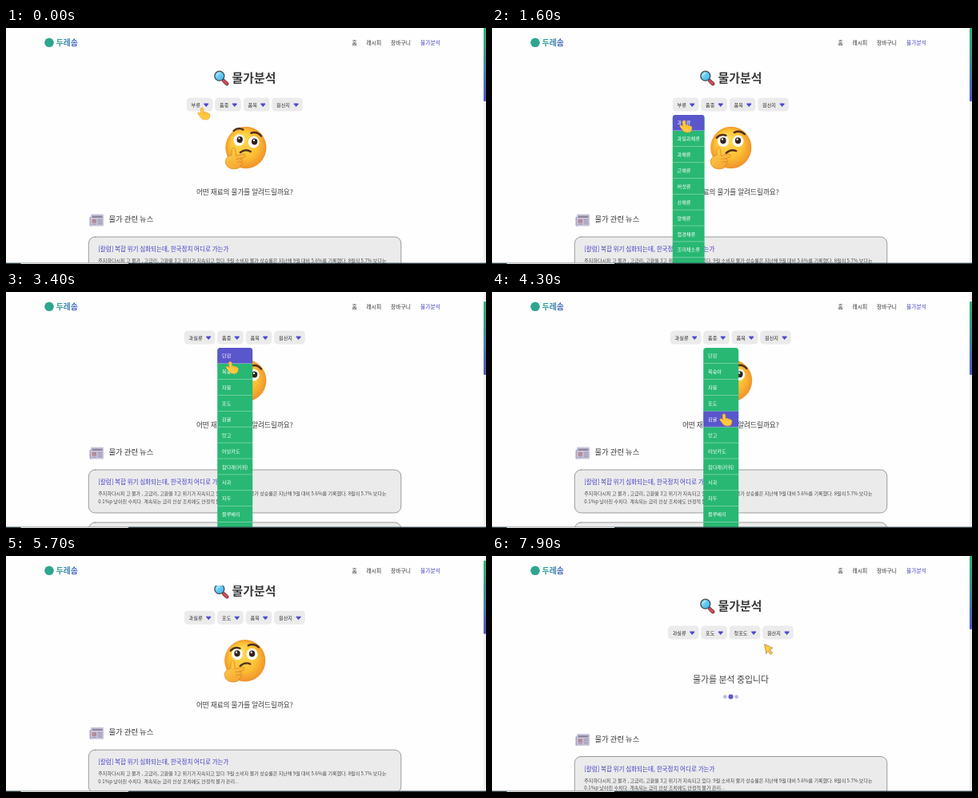
These frames come from a looping animation (600 by 296 pixels, 8000 ms). An HTML page with a canvas:

```html
<!DOCTYPE html>
<html lang="ko">
<head>
<meta charset="utf-8">
<title>물가분석</title>
<style>
  html, body { margin: 0; width: 100%; height: 100%; overflow: hidden; background: #fefefe; }
  canvas { display: block; width: 600px; height: 296px; }
</style>
</head>
<body>
<canvas id="stage"></canvas>
<script>
const W = 600, H = 296, LOOP = 8000;
const FONT = '"Noto Sans CJK KR", "Noto Sans CJK", "Noto Sans", sans-serif';
const GREEN = '#28b873', PURPLE = '#5a56cb', INK = '#3a3a3c';
const canvas = document.getElementById('stage');
const ctx = canvas.getContext('2d');
const dpr = window.devicePixelRatio || 1;
canvas.width = W * dpr;
canvas.height = H * dpr;

const ease = p => p * p * (3 - 2 * p);
const ramp = (t, a, b) => ease(Math.min(1, Math.max(0, (t - a) / (b - a))));

// y is the optical centre of the line
function text(str, x, y, size, color = INK, weight = 400, align = 'left') {
  ctx.font = `${weight} ${size}px ${FONT}`;
  ctx.textAlign = align;
  ctx.fillStyle = color;
  ctx.fillText(str, x, y + size * 0.37);
}
function box(x, y, w, h, r, fill, stroke, line = 0.8) {
  ctx.beginPath();
  ctx.roundRect(x, y, w, h, r);
  if (fill) { ctx.fillStyle = fill; ctx.fill(); }
  if (stroke) { ctx.strokeStyle = stroke; ctx.lineWidth = line; ctx.stroke(); }
}
function oval(x, y, rx, ry, fill, angle = 0) {
  ctx.beginPath();
  ctx.ellipse(x, y, rx, ry, angle, 0, 7);
  ctx.fillStyle = fill;
  ctx.fill();
}
function curve(color, width, x0, y0, cx, cy, x1, y1) {
  ctx.beginPath();
  ctx.moveTo(x0, y0);
  ctx.quadraticCurveTo(cx, cy, x1, y1);
  ctx.strokeStyle = color;
  ctx.lineWidth = width;
  ctx.lineCap = 'round';
  ctx.stroke();
}
function shape(d, fill, stroke, line) {
  const path = new Path2D(d);
  ctx.fillStyle = fill;
  ctx.fill(path);
  if (stroke) {
    ctx.strokeStyle = stroke;
    ctx.lineWidth = line;
    ctx.lineJoin = 'round';
    ctx.stroke(path);
  }
}
function gradient(x0, y0, x1, y1, ...colors) {
  const g = ctx.createLinearGradient(x0, y0, x1, y1);
  colors.forEach((c, i) => g.addColorStop(i / (colors.length - 1), c));
  return g;
}

const menus = [
  { slot: 0, from: 1000, to: 1850, items: ['과실류', '과일과채류', '과채류', '근채류', '버섯류', '산채류', '양채류', '엽경채류', '조미채소류', '서류'] },
  { slot: 1, from: 2750, to: 5350, items: ['단감', '복숭아', '자몽', '포도', '감귤', '망고', '아보카도', '참다래(키위)', '사과', '자두', '블루베리', '배'] },
  { slot: 2, from: 6300, to: 7350, items: ['기타포도', '레드글로브', '거봉', '마스캇베리에이', '청포도', '피오네', '포도', '고처', '블랙올림피아', '델라웨어'] }
];
const LOADING = 7400;

// time, x, y of the pointer tip
const track = [
  [0, 245, 100], [800, 243, 100], [1100, 243, 100], [1500, 240, 116], [1850, 240, 116],
  [2300, 277, 97], [2900, 277, 97], [3300, 280, 85], [4200, 290, 153], [4450, 290, 153],
  [5000, 286, 135], [5450, 286, 135], [5900, 317, 95], [6300, 317, 95], [6600, 327, 124],
  [6750, 327, 124], [7150, 324, 196], [7400, 324, 196], [7750, 340, 110], [8000, 340, 110]
];
function pointerAt(t) {
  const i = track.findIndex(k => k[0] > t);
  const a = track[i - 1], b = track[i], p = ramp(t, a[0], b[0]);
  return [a[1] + (b[1] - a[1]) * p, a[2] + (b[2] - a[2]) * p];
}
const scrollAt = t => 39 * (ramp(t, 2950, 3350) - ramp(t, 5450, 5940));

function buttonsAt(t) {
  const labels = [t < 1850 ? '부류' : '과실류', t < 5350 ? '품종' : '포도', t < 7350 ? '품목' : '청포도', '원산지'];
  const widths = labels.map(s => 20.9 + 5.9 * s.length);
  let x = 298.3 - (widths.reduce((a, b) => a + b) + 8.4) / 2;
  return labels.map((label, i) => {
    const b = { label, x, w: widths[i] };
    x += b.w + 2.8;
    return b;
  });
}
function drawButton({ label, x, w }) {
  box(x, 87.5, w, 17, 4.5, '#ebebeb');
  text(label, x + 5.8, 96.3, 6.15, '#2e2e30', 500);
  const c = x + w - 8;
  shape(`M${c - 2.6} 95 h5.2 l-2.6 3.2 z`, '#4a45cf', '#4a45cf', 1);
}

function drawMenu(menu, x, hover) {
  const pitch = 19.9, top = 109;
  ctx.font = `500 6.15px ${FONT}`;
  const w = Math.max(...menu.items.map(s => ctx.measureText(s).width)) + 11.6;
  ctx.save();
  box(x, top, w, pitch * menu.items.length, 4, GREEN);
  ctx.clip();
  menu.items.forEach((item, i) => {
    const y = top + i * pitch;
    if (hover >= y && hover < y + pitch) {
      ctx.fillStyle = PURPLE;
      ctx.fillRect(x, y, w, pitch);
    }
    ctx.fillStyle = 'rgba(255,255,255,.55)';
    ctx.fillRect(x, y + pitch - 0.6, w, 0.6);
    text(item, x + 5.8, y + 10, 6.15, '#fff', 500);
  });
  ctx.restore();
}

function drawLens() {
  curve('#4b3540', 4.4, 272.2, 66.2, 274, 68, 276.2, 70);
  curve('#e0484e', 3, 272.2, 66.2, 274, 68, 276.2, 70);
  oval(266.8, 60.2, 6.6, 6.6, '#3c4650');
  oval(266.8, 60.2, 5.4, 5.4, gradient(262, 55, 271, 66, '#8fe0fa', '#3fb4ea'));
  curve('#d6f5ff', 1, 263.6, 60, 264, 57.2, 266.6, 56.8);
}

function drawPaper(y) {
  box(104.5, y - 5, 4, 12, 1.5, '#a9a4bd');
  box(106, y - 8, 16, 15, 1, '#cbc6dc');
  box(107.5, y - 6, 13, 2.4, 0.4, '#8b87a0');
  box(107.5, y - 1.8, 5.6, 5, 0.4, '#b58a9d');
  for (let i = 0; i < 4; i++) box(114.5, y - 1.8 + i * 1.9, 6, 0.9, 0, '#928da8');
  box(107.5, y + 4.2, 5.6, 0.9, 0, '#928da8');
}

function drawFace(t) {
  const sway = Math.tanh(2 * Math.cos((t - 200) / 3400 * 2 * Math.PI));
  ctx.save();
  ctx.translate(299.3 + sway * 0.6, 150);
  const skin = ctx.createRadialGradient(-6, -12, 3, 0, 0, 27);
  skin.addColorStop(0, '#ffdc55');
  skin.addColorStop(0.6, '#fdc034');
  skin.addColorStop(1, '#ee8f2c');
  oval(0, 0, 25.6, 26.2, skin);
  ctx.save();
  ctx.rotate(0.07 + sway * 0.07);
  for (const x of [-9.8, 8.8]) {
    oval(x, -8.2, 6.9, 7.3, '#fff');
    oval(x + 0.4 + sway * 0.5, -8.8, 3.7, 4, '#33231f');
    oval(x - 0.5 + sway * 0.5, -10.4, 1.1, 1.2, '#fff');
  }
  const lift = sway * 3.5;
  curve('#51301f', 2.5, -18, -15.5 - lift, -13, -21 - lift, -6.5, -18.5 - lift);
  curve('#51301f', 2.5, 4, -19, 11, -22.5, 17, -17);
  curve('#51301f', 2.4, -6, 6.8, 0, 1.2, 6.5, 4.2);
  ctx.restore();
  const hand = gradient(-20, 0, -5, 27, '#ffd34d', '#f4a02e');
  shape('M-17.6 2.5 c0-3 3.9-3 4.2 0 l1 8 c4-1 8-2.4 10.2-2.2 c2.2.4 2 3.3 0 4 l-4.6 1.6 c3 .9 3 3 1.3 4 c1.4 1.2 1 3.2-.8 3.9 c-.3 3-4 5-8.3 5 c-7.4 0-11.6-4.4-10.6-11 c.4-3.2 5-6 7-6 z',
    hand, '#dc8723', 0.8);
  curve('#d98622', 0.8, -12, 14.5, -9, 13, -5.6, 13.9);
  curve('#d98622', 0.8, -11, 18.2, -8, 17, -5, 17.9);
  ctx.restore();
}

function drawLoading(t) {
  text('물가를 분석 중입니다', 298.5, 154.5, 10.9, '#424244', 400, 'center');
  for (let i = 0; i < 3; i++) {
    const k = Math.max(0, Math.cos(((t - 7900) / 900 - (i - 1) / 3) * 2 * Math.PI));
    ctx.globalAlpha = 0.4 + 0.6 * k;
    oval(291.3 + i * 7.2, 176.6, 2.4 + 0.6 * k, 2.4 + 0.6 * k, PURPLE);
  }
  ctx.globalAlpha = 1;
}

function drawNews(shift) {
  drawPaper(241.5 + shift);
  text('물가 관련 뉴스', 128.5, 239.7 + shift, 9.35, INK, 500);
  for (let i = 0; i < 2; i++) box(103.3, 262 + shift + i * 66, 390.5, 54, 8, '#ebebeb', '#858585');
  text('[칼럼] 복합 위기 심화되는데, 한국정치 어디로 가는가', 115.3, 277.3 + shift, 7.55, '#3f3cc4', 500);
  text('주지하다시피 고 물가 , 고금리, 고환율 3고 위기가 지속되고 있다. 9월 소비자 물가 상승률은 지난해 9월 대비 5.6%를 기록했다. 8월의 5.7% 보다는', 115.3, 292 + shift, 6.06, '#48484a');
  text('0.1%p 낮아진 수치다. 계속되는 금리 인상 조치에도 안정적 물가 관리...', 115.3, 301.4 + shift, 6.06, '#48484a');
}

function drawHeader() {
  ctx.fillStyle = '#fefefe';
  ctx.fillRect(0, 0, W, 37);
  oval(54, 18.3, 5.8, 5.8, '#2da58f');
  text('두레솜', 62.8, 18.5, 9.8, gradient(63, 13, 90, 24, '#27ad80', '#3a86b4', '#4b58c6'), 700);
  [['홈', 432.6], ['레시피', 450.6], ['장바구니', 481], ['물가분석', 518]].forEach(([s, x], i) =>
    text(s, x, 18.5, 6.75, i === 3 ? '#4a45cf' : '#2e2e30', 500));
}

function drawFrame(scroll) {
  const y = scroll * 0.31;
  ctx.fillStyle = '#f0f0f0';
  ctx.fillRect(596.8, 0, 3.2, H);
  box(597, y, 3, 92, 1, gradient(0, y, 0, y + 92, '#28b873', '#3b8d9d', '#5552cc'));
  ctx.fillStyle = '#27373d';
  ctx.fillRect(0, 294.6, W, 1.4);
  ctx.fillStyle = '#dadada';
  ctx.fillRect(18.5, 294.6, 134.5, 1.4);
}

function drawPointer(t, x, y) {
  if (t > 5450 && t < 5900) return;
  ctx.save();
  ctx.translate(x, y);
  if (t > LOADING) {
    shape('M.5 .5 L11 5.4 L7.3 7.4 L10.6 11.6 L8.3 13.5 L5 9.2 L2.8 12.6 Z', '#ffcb3f', '#a78a54', 0.8);
  } else {
    shape('M-1.8 1.5 c0-2 3.4-2 3.5 0 l.3 4.2 c2-.8 2.9 0 3.1.7 c1.6-.6 2.6.2 2.8.9 c1.6-.2 2 .7 1.9 2 c-.1 3.6-1.4 5.7-5 5.7 c-4.4 0-5.6-1.6-7.2-3.9 l-2.6-3.3 c-.8-1.3 1-2.5 2.2-1.5 l1.5 1.3 z',
      '#ffc93e', '#e2a234', 0.7);
    curve('#dd9a2c', 0.5, 2.1, 6, 2.3, 7.5, 2.4, 8.8);
    curve('#dd9a2c', 0.5, 5.1, 6.8, 5.2, 8, 5.2, 9.2);
  }
  ctx.restore();
}

function render(t) {
  const scroll = scrollAt(t), [px, py] = pointerAt(t), buttons = buttonsAt(t);
  ctx.setTransform(dpr, 0, 0, dpr, 0, 0);
  ctx.fillStyle = '#fefefe';
  ctx.fillRect(0, 0, W, H);

  ctx.save();
  ctx.translate(0, -scroll);
  drawLens();
  text('물가분석', 282.6, 62.3, 14.9, INK, 700);
  buttons.forEach(drawButton);
  if (t < LOADING) {
    drawFace(t);
    text('어떤 재료의 물가를 알려드릴까요?', 298.4, 205.3, 8.65, '#3a3a3c', 400, 'center');
  } else {
    drawLoading(t);
  }
  drawNews(t < LOADING ? 0 : -10.5);
  const menu = menus.find(m => t >= m.from && t < m.to);
  if (menu) drawMenu(menu, buttons[menu.slot].x, py + scroll + 2);
  ctx.restore();

  drawHeader();
  drawFrame(scroll);
  drawPointer(t, px, py);
}

const start = performance.now();
function tick() {
  render((performance.now() - start) % LOOP);
  requestAnimationFrame(tick);
}
tick();
</script>
</body>
</html>
```
